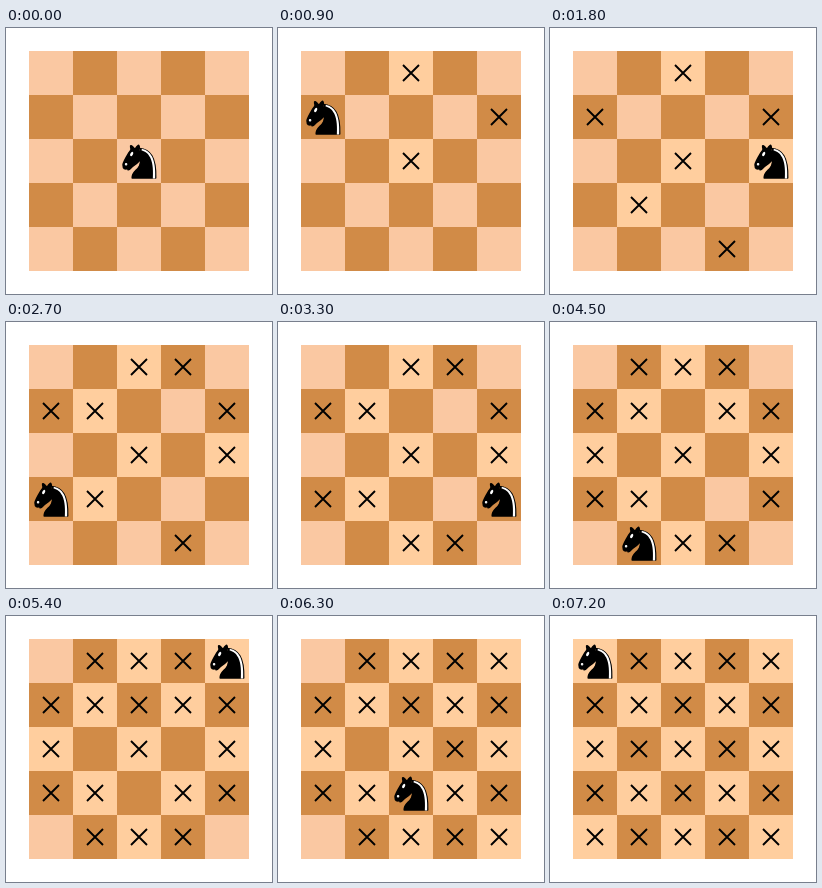
An HTML page that plays this animation: 266x266 px, repeating every 8000 ms.

```html
<!DOCTYPE html>
<html lang="en">
<head>
<meta charset="utf-8">
<title>Knight's tour</title>
<style>
  html, body { margin: 0; width: 100%; height: 100%; overflow: hidden; background: #fff; }
  svg { display: block; width: 100%; height: 100%; }
  .cross { stroke: #000; stroke-width: 1.9; fill: none; }
</style>
</head>
<body>
<svg id="stage" viewBox="0 0 266 266">
  <g id="board" shape-rendering="crispEdges"></g>
  <g id="marks"></g>
  <g id="knight">
    <g transform="translate(-.1 -.8) scale(1.02)" stroke="#000" stroke-width="1.5" stroke-linecap="round" stroke-linejoin="round">
      <path d="M22,10C32.5,11 38.5,18 38,39L15,39C15,30 25,32.5 23,18"/>
      <path d="M24,18C24.38,20.91 18.45,25.37 16,27C13,29 13.18,31.34 11,31C9.96,30.06 12.41,27.96 11,28C10,28 11.19,29.23 10,30C9,30 6,31 6,26C6,24 12,14 12,14C12,14 13.89,12.1 14,10.5C13.27,9.5 13.5,8.5 13.5,7.5C14.5,6.5 16.5,10 16.5,10L18.5,10C18.5,10 19.28,8 21,7C22,7 22,10 22,10"/>
      <g fill="#fff" stroke="#fff">
        <circle cx="9" cy="25.5" r=".5"/>
        <ellipse cx="14.5" cy="15.5" rx=".5" ry="1.5" transform="rotate(30 14.5 15.5)"/>
        <path stroke="none" d="M24.55,10.4L24.1,11.85L24.6,12C27.75,13 30.25,14.49 32.5,18.75C34.75,23.01 35.75,29.06 35.25,39L35.2,39.5L37.45,39.5L37.5,39C38,28.94 36.62,22.15 34.25,17.66C31.88,13.17 28.46,11.02 25.06,10.5Z"/>
      </g>
    </g>
  </g>
</svg>
<script>
const SIZE = 5, CELL = 44, EDGE = 23, STEP = 300, LOOP = 8000;
const DARK = '#d18b47', FRESH = '#fac8a2', VISITED = '#ffce9e';

// Each stop is column then row.
const tour = '22 41 20 01 13 34 42 30 11 03 24 43 31 10 02 14 33 21 40 32 44 23 04 12 00'
  .split(' ').map(stop => [...stop].map(Number));

const byId = id => document.getElementById(id);
const at = n => EDGE + n * CELL;

function add(parent, tag, attrs) {
  const el = document.createElementNS('http://www.w3.org/2000/svg', tag);
  for (const key in attrs) el.setAttribute(key, attrs[key]);
  return parent.appendChild(el);
}

const squares = tour.map(([col, row]) => ({
  light: (col + row) % 2 === 0,
  x: at(col),
  y: at(row),
  tile: add(byId('board'), 'rect', { x: at(col), y: at(row), width: CELL, height: CELL }),
  cross: add(byId('marks'), 'path', {
    class: 'cross',
    d: `M${at(col) + 14},${at(row) + 14}l16,16m0,-16l-16,16`
  })
}));

let shown = -1;

function draw(now) {
  const current = Math.min(Math.floor((now % LOOP) / STEP), tour.length - 1);
  if (current !== shown) {
    shown = current;
    squares.forEach((sq, i) => {
      const reached = current > 0 && i <= current;
      sq.tile.setAttribute('fill', !sq.light ? DARK : reached ? VISITED : FRESH);
      sq.cross.setAttribute('visibility', i < current ? 'visible' : 'hidden');
    });
    const { x, y } = squares[current];
    byId('knight').setAttribute('transform', `translate(${x} ${y})`);
  }
}

const start = performance.now();
function tick() {
  draw(performance.now() - start);
  requestAnimationFrame(tick);
}
tick();
</script>
</body>
</html>
```
